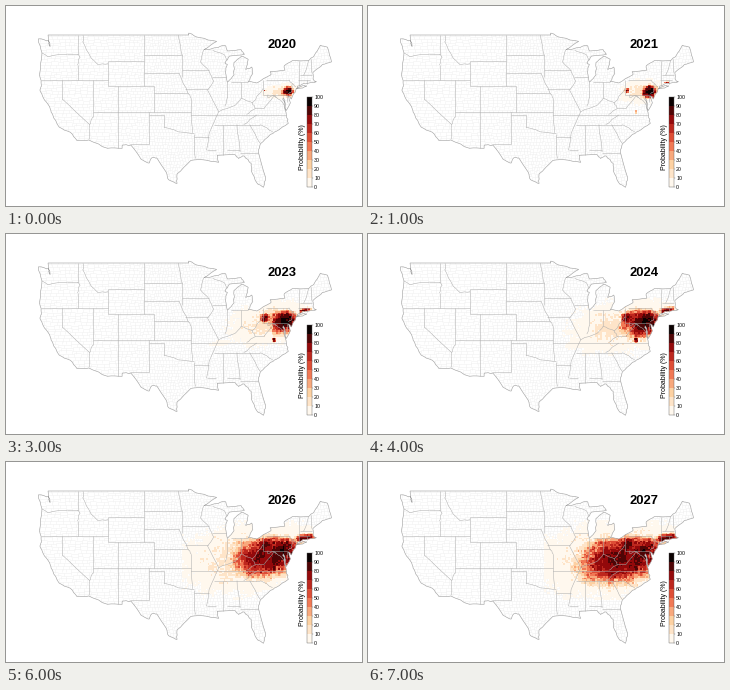
A matplotlib script that plays this animation: 356 by 200 pixels, repeating every 8 s.

```python
import matplotlib.pyplot as plt
import numpy as np
from matplotlib.animation import FuncAnimation
from matplotlib.collections import LineCollection
from matplotlib.colors import LinearSegmentedColormap
from matplotlib.patches import PathPatch, Rectangle
from matplotlib.path import Path

W, H, DPI = 356, 200, 100
PX = 72 / DPI  # points per pixel
FONT = "Liberation Sans"
YEARS = 8
CMAP = LinearSegmentedColormap.from_list(
    "risk", ["#fff8ee", "#fdcc99", "#ee6142", "#a50b0d", "#0a0101"], N=10)
CMAP.set_bad((1, 1, 1, 0))
rng = np.random.default_rng(7)

# Key points of the shoreline as (longitude, latitude)
PACIFIC = [(-122.8, 49), (-122.4, 47.2), (-122.7, 48.1), (-124.7, 48.4),
           (-124, 46.2), (-124.5, 42.8), (-124.1, 41), (-124.4, 40.4),
           (-123.8, 39.3), (-122.5, 37.8), (-121.9, 36.6), (-120.6, 34.6),
           (-118.4, 33.8), (-117.1, 32.5)]
SOUTH = [(-114.8, 32.6), (-111.1, 31.3), (-108.2, 31.3), (-108.2, 31.8),
         (-106.5, 31.8), (-104.5, 29.6), (-103.1, 29), (-102.4, 29.8),
         (-101.4, 29.8), (-99.5, 27.5), (-99.1, 26.4), (-97.4, 25.8),
         (-97.4, 27.3), (-94.7, 29.4), (-92.3, 29.5), (-89.2, 29.1),
         (-89.5, 30.2), (-86, 30.3), (-85.3, 29.7), (-84.2, 30.1),
         (-82.8, 28.9), (-82.8, 27.8), (-81.7, 25.9), (-80.4, 25.2)]
ATLANTIC = [(-80, 26.8), (-81.4, 30.7), (-81, 32), (-79, 33.5),
            (-78, 33.9), (-75.5, 35.2), (-75.9, 36.5), (-76.3, 38),
            (-76.5, 39.2), (-76.2, 38.6), (-75.9, 37.2), (-75.1, 38.4),
            (-75.5, 39.5), (-74.9, 39), (-74, 40.5), (-73.7, 41),
            (-71.4, 41.5), (-70, 41.7), (-70.6, 42), (-70.7, 43.1),
            (-68.8, 44.4), (-67, 44.8), (-67.8, 47.1), (-69.2, 47.4),
            (-70.4, 45.8), (-71.5, 45)]
LAKES = [(-74.7, 45), (-76.3, 44.2), (-76.2, 43.5), (-79, 43.3),
         (-78.9, 42.8), (-81.7, 41.5), (-83.4, 41.7), (-82.5, 43),
         (-82.7, 44), (-83.9, 43.6), (-83.4, 45.2), (-84.7, 45.7),
         (-86.2, 44.7), (-86.2, 42.8), (-87.5, 41.6), (-87.9, 43.2),
         (-87.5, 44.4), (-88, 44.6), (-87.1, 45.7), (-84.1, 46),
         (-84.8, 46.7), (-87.5, 46.5), (-88, 47.4), (-90.8, 46.8),
         (-92.1, 46.7), (-89.6, 48), (-93, 48.6), (-95.1, 49.3), (-95.1, 49)]
LONG_ISLAND = [(-74, 40.6), (-72.3, 41.1), (-71.9, 41), (-73, 40.7)]

# Straight borders: (latitude, west, east) and (longitude, south, north)
PARALLELS = [
    (46, -119, -117), (42, -124.2, -111), (45, -111, -104),
    (45.9, -104, -96.5), (43, -104, -97), (41, -111, -102),
    (40, -102, -95.3), (37, -114, -94.6), (36.5, -103, -100),
    (43.5, -96.4, -91.2), (40.6, -95.8, -91.4), (36.5, -94.6, -75.9),
    (42.5, -90.6, -87.8), (41.7, -86.8, -83.4), (35, -90.1, -81),
    (33, -94, -91.1), (31, -91.6, -89.7), (31, -87.6, -85),
    (30.6, -85, -81.4), (32, -106.6, -103), (42, -79.8, -75.4),
    (39.7, -80.5, -75.7), (42, -73.5, -71.2), (42.7, -73.3, -70.8)]
MERIDIANS = [
    (-117, 42, 44.3), (-117, 46, 49), (-116, 48, 49), (-111, 41, 45),
    (-104, 41, 49), (-120, 39, 42), (-114, 36.2, 42), (-109, 31.3, 41),
    (-102, 37, 41), (-103, 32, 37), (-100, 34.6, 36.5), (-96.4, 42.5, 46),
    (-94.6, 36.5, 39.1), (-94, 31.9, 33.6), (-87.5, 39.3, 41.7),
    (-84.8, 39.1, 41.7), (-80.5, 39.7, 42), (-88.3, 30.3, 35),
    (-75.7, 38.5, 39.7), (-73.4, 41, 45), (-71.8, 41.3, 42),
    (-71, 43.2, 45.3)]
# Rivers, ridges and slanted borders
WINDING = [
    [(-124, 46.2), (-122.8, 45.6), (-119, 46)],
    [(-117, 46), (-116.5, 45.5), (-117, 44.3)],
    [(-116, 48), (-114.4, 45.5), (-113, 44.4), (-111, 44.5)],
    [(-120, 39), (-114.6, 35), (-114.7, 32.7)],
    [(-114, 36.2), (-114.6, 35)],
    [(-97.2, 49), (-96.5, 45.9)],
    [(-97, 43), (-95.3, 40), (-94.6, 39.1)],
    [(-100, 34.6), (-96, 33.8), (-94, 33.6)],
    [(-94.6, 36.5), (-94.4, 33.7)],
    [(-94, 31.9), (-93.8, 29.7)],
    [(-92.2, 46.7), (-92.8, 44.8), (-91.2, 43.5), (-90.2, 41.8),
     (-91.4, 40.4), (-89.2, 37), (-91.1, 33.6), (-91.6, 31)],
    [(-90.4, 46.6), (-88.1, 45.9), (-87.6, 45.1)],
    [(-89.2, 37), (-86, 38), (-84.8, 39.1), (-82.6, 38.4), (-80.5, 40.6)],
    [(-87.5, 39.3), (-88, 37.9)],
    [(-82.6, 38.4), (-82, 37.5), (-83.7, 36.6)],
    [(-82, 37.5), (-80.3, 37.5), (-78.4, 39.4), (-77.8, 39.3)],
    [(-79.5, 39.7), (-79.5, 39.2), (-78.4, 39.6), (-77, 38.8), (-76.3, 38)],
    [(-75.5, 39.8), (-74.8, 40.2), (-74.7, 41.4), (-75.4, 42)],
    [(-74.7, 41.4), (-74, 40.9)],
    [(-72.5, 42.7), (-71.5, 45)],
    [(-84.3, 35), (-81.7, 36.5)],
    [(-81, 35), (-78.6, 33.9)],
    [(-83.1, 35), (-81.1, 32.1)],
    [(-85.6, 35), (-85, 30.7)]]


def project(points):
    lon, lat = np.transpose(points)
    return np.column_stack([32.4 + (lon + 124.7) * 5.08,
                            29 + (49 - lat) * 6.4])


def wiggle(points, parts=4, size=0.3):
    """Split each leg and shake the points in between."""
    pts = project(points)
    out = []
    for a, b in zip(pts, pts[1:]):
        leg = a + (b - a) * np.arange(parts)[:, None] / parts
        leg[1:] += rng.normal(0, size, (parts - 1, 2))
        out.append(leg)
    return np.vstack(out + [pts[-1:]])


def ring(points):
    pts = wiggle(points)
    return Path(np.vstack([pts, pts[:1]]), closed=True)


def county_lines():
    """Irregular brickwork, coarser towards the west."""
    segs = []
    for y in np.arange(27, 184, 3.2):
        x = 31 + rng.uniform(0, 3)
        while x < 328:
            step = np.interp(x, [100, 150], [6, 3]) * rng.uniform(0.75, 1.25)
            top = y + rng.uniform(-0.6, 0.6)
            segs += [[(x, top), (x + step, top)], [(x, top), (x, top + 3.2)]]
            x += step
    return segs


# Spread model on a grid of square cells
X0, X1, Y0, Y1, CELL = 176, 312, 58, 138, 1.6
NX, NY = round((X1 - X0) / CELL), round((Y1 - Y0) / CELL)
gx, gy = np.meshgrid(X0 + (np.arange(NX) + 0.5) * CELL,
                     Y0 + (np.arange(NY) + 0.5) * CELL)
patches = np.kron(rng.normal(size=(NY // 4 + 1, NX // 4 + 1)),
                  np.ones((4, 4)))[:NY, :NX]
noise = 0.35 * rng.normal(size=(NY, NX)) + 0.3 * patches


def chance(cx, cy, a, b, soft=0.3, shift=0.0, tilt=0.17):
    """Noisy probability that falls off across a tilted ellipse."""
    dx, dy = gx - cx, gy - cy
    u = dx * np.cos(tilt) - dy * np.sin(tilt)
    v = dx * np.sin(tilt) + dy * np.cos(tilt)
    z = (1 - np.hypot(u / a, v / b) ** 1.5) / soft + shift + noise
    return 1 / (1 + np.exp(-np.clip(z, -30, 30)))


def spread(year):
    u = year / (YEARS - 1)
    drift = u ** 1.9
    ease = np.sin(np.pi / 2 * u) ** 2

    cold = -0.3 * np.maximum(0, 77 - gy)
    ridge = -1.3 * (1 - 0.4 * u) * np.exp(
        -((gx - 263 + 0.7 * (gy - 92)) / 3) ** 2 - ((gy - 94) / 10) ** 2)
    near = np.exp(-((gx - 284) ** 2 + (gy - 87) ** 2) / (40 + 150 * u))

    core = chance(282 - 29 * drift, 85.5 + 11.5 * drift,
                  5 + 32 * u ** 1.6, 4 + 17 * u ** 1.2,
                  shift=cold + ridge + near)
    west = chance(259, 84.5, 0.8 + 1.2 * year, 0.8 + 1.2 * year)
    south = chance(268, 106, 0.1 + 0.6 * year, 0.1 + 0.6 * year)
    coast = chance(299, 76, 0.5 + 11 * u, 0.5 + 3.5 * u)
    halo = chance(275 - 29 * ease, 85 + 10 * ease,
                  16 + 48 * ease, 6 + 28 * u, soft=0.4)
    tail = chance(215, 109, 30 * ease, 8 * ease) if year else 0

    hot = np.maximum.reduce([core, west, south, coast])
    p = np.maximum(hot * (0.86 + 0.12 * near), 0.13 * halo)
    return np.ma.masked_less(np.maximum(p, 0.07 * tail), 0.035)


fig = plt.figure(figsize=(W / DPI, H / DPI), dpi=DPI, facecolor="white")
ax = fig.add_axes([0, 0, 1, 1])

land = Path.make_compound_path(ring(PACIFIC + SOUTH + ATLANTIC + LAKES),
                               ring(LONG_ISLAND))
outline = PathPatch(land, fc="none", ec="#a2a2a2", lw=0.6 * PX, zorder=4)
ax.add_patch(outline)

counties = LineCollection(county_lines(), colors="#f0f0f0",
                          linewidths=0.5 * PX, zorder=1)
ax.add_collection(counties)
counties.set_clip_path(outline)

heat = ax.imshow(spread(0), cmap=CMAP, vmin=0, vmax=1, aspect="auto",
                 extent=(X0, X1, Y1, Y0), interpolation="nearest", zorder=2)
heat.set_clip_path(outline)

borders = [project([(w, lat), (e, lat)]) for lat, w, e in PARALLELS]
borders += [project([(lon, s), (lon, n)]) for lon, s, n in MERIDIANS]
borders += [wiggle(line) for line in WINDING]
ax.add_collection(LineCollection(borders, colors="#adadad",
                                 linewidths=0.5 * PX, zorder=3))

# Colour scale
BAR_X, BAR_W, BAR_TOP, STEP = 301, 5, 91, 9
for k in range(10):
    ax.add_patch(Rectangle((BAR_X, BAR_TOP + (9 - k) * STEP), BAR_W, STEP,
                           fc=CMAP(k), ec="none", zorder=5))
ax.add_patch(Rectangle((BAR_X, BAR_TOP), BAR_W, 10 * STEP, fc="none",
                       ec="#555555", lw=0.4 * PX, zorder=6))
for k in range(11):
    y = BAR_TOP + (10 - k) * STEP
    ax.plot([BAR_X + BAR_W, BAR_X + BAR_W + 1], [y, y], color="#555555",
            lw=0.4 * PX)
    ax.text(308.2, y, str(k * 10), fontsize=5.3 * PX, family=FONT,
            va="center_baseline")
ax.text(296.2, 140.6, "Probability (%)", fontsize=7 * PX, family=FONT,
        rotation=90, ha="center", va="center")

title = ax.text(275.6, 41.5, "2020", fontsize=13 * PX, family=FONT,
                weight="bold", ha="center", va="baseline")

ax.set_xlim(0, W)
ax.set_ylim(H, 0)
ax.axis("off")


def update(year):
    heat.set_data(spread(year))
    title.set_text(str(2020 + year))
    return heat, title


anim = FuncAnimation(fig, update, frames=YEARS, interval=1000, repeat=True,
                     repeat_delay=0)
plt.show()
```
